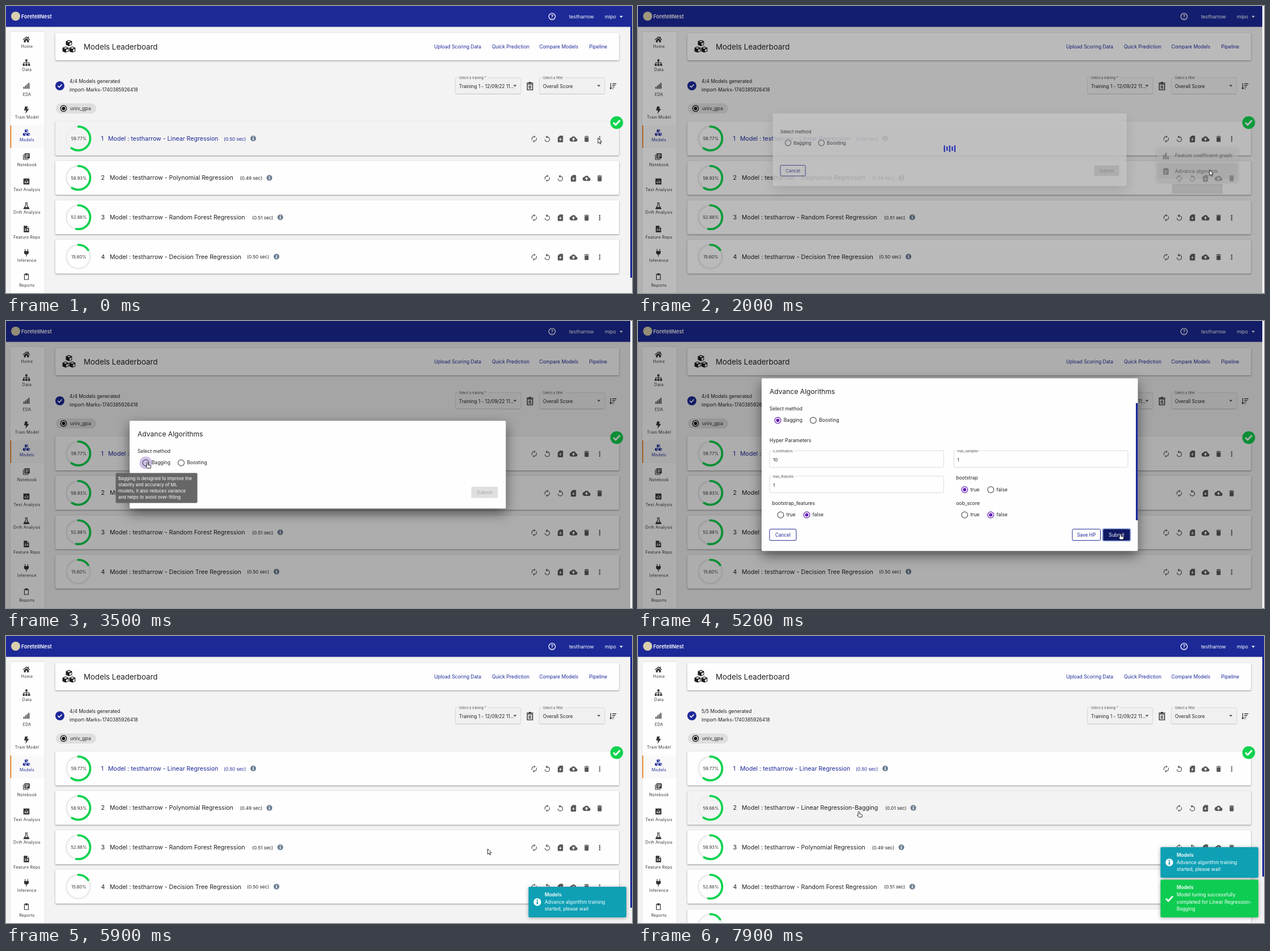
An HTML page with a canvas that plays this animation: 1104x507 px, repeating every 8000 ms.

```html
<!DOCTYPE html>
<html lang="en">
<head>
<meta charset="utf-8">
<title>Models Leaderboard</title>
<style>
  html, body { margin: 0; width: 100%; height: 100%; overflow: hidden; background: #f3f3f3; }
  canvas { display: block; width: 1104px; height: 507px; }
</style>
</head>
<body>
<canvas id="stage"></canvas>
<script>
const W = 1104, H = 507, LOOP = 8000, STEP = 100;
const NAVY = '#1c2997', INK = '#222', GREEN = '#0fd350', PURPLE = '#641bb4', GREY = '#585858';
const USER = 'testharrow';

const canvas = document.getElementById('stage');
const ctx = canvas.getContext('2d');
const dpr = window.devicePixelRatio || 1;
canvas.width = W * dpr;
canvas.height = H * dpr;

const cube = (x, y) => `M${x} ${y}l5 2v6l-5 2-5-2v-6z` +
  `M${x} ${y + 1.3}l3 1.2-3 1.2-3-1.2zM${x + 1} ${y + 5.3}l3-1.3v3.4l-3 1.2z`;

// Icons live in a 24 unit box.
const ICONS = {
  home: 'M12 3L1 12.5l1.5 1.7L12 6l9.5 8.2 1.5-1.7-4-3.5V4h-3v2.5zM12 8l-7.5 6.5V21H10v-5h4v5h5.5v-6.5z',
  tree: 'M9 2h6v6H9zM1 16h6v6H1zM9 16h6v6H9zM17 16h6v6h-6zM11 8h2v3h8v5h-2v-3h-6v3h-2v-3H5v3H3v-5h8z',
  bars: 'M3 15h3v6H3zM8 11h3v10H8zM13 7h3v14h-3zM18 3h3v18h-3z',
  bolt: 'M8 1h8l-2 7h6L9 23l2-10H5z',
  cubes: cube(12, 1) + cube(6.5, 11.5) + cube(17.5, 11.5),
  book: 'M4 6H2v14c0 1.1.9 2 2 2h14v-2H4zM20 2H8c-1.1 0-2 .9-2 2v12c0 1.1.9 2 2 2h12c1.1 0 2-.9 2-2V4c0-1.1-.9-2-2-2zM19 11H9V9h10zM15 15H9v-2h6zM19 7H9V5h10z',
  chart: 'M3 3h18v18H3zM7 11h2v6H7zM11 7h2v2h-2zM11 13h2v4h-2zM15 10h2v7h-2z',
  flask: 'M8 2h8v2h-1v6l6 10c.5 1-.2 2-1.2 2H4.2c-1 0-1.7-1-1.2-2L9 10V4H8zM11 4v6.5L8 16h8l-3-5.5V4z',
  file: 'M4 2h10l6 6v14H4zM7 11h5v2H7zM7 15h5v2H7zM14 4v5h5zM14 12h3v5h-3z',
  plug: 'M7 1h2v6h6V1h2v6h2v4c0 3.5-2.5 6-6 6.5V23h-2v-5.5C7.5 17 5 14.5 5 11V7h2z',
  clip: 'M5 4h4V2h6v2h4v18H5zM7 6v14h10V6h-2v2H9V6z',
  task: 'M4 3h5V1h6v2h5v18H4zM7 8h10v2H7zM7 12h10v2H7zM7 16h7v2H7z',
  columns: 'M4 9h4v12H4zM10 3h4v18h-4zM16 13h4v8h-4z',
  bin: 'M9 1h6v2h6v2H3V3h6zM4 6h16v17H4zM6 8v13h12V8zM9 10h2v9H9zM13 10h2v9h-2z',
  sort: 'M5 3h2v14h3l-4 5-4-5h3zM11 4h12v2H11zM11 9h9v2h-9zM11 14h6v2h-6zM11 19h3v2h-3z',
  sync: 'M12 6v3l4-4-4-4v3c-4.42 0-8 3.58-8 8 0 1.57.46 3.03 1.24 4.26L6.7 14.8c-.45-.83-.7-1.79-.7-2.8 0-3.31 2.69-6 6-6zm6.76 1.74L17.3 9.2c.44.84.7 1.79.7 2.8 0 3.31-2.69 6-6 6v-3l-4 4 4 4v-3c4.42 0 8-3.58 8-8 0-1.57-.46-3.03-1.24-4.26z',
  replay: 'M12 5V1L7 6l5 5V7c3.31 0 6 2.69 6 6s-2.69 6-6 6-6-2.69-6-6H4c0 4.42 3.58 8 8 8s8-3.58 8-8-3.58-8-8-8z',
  save: 'M18 2h-8L4 8v12c0 1.1.9 2 2 2h12c1.1 0 2-.9 2-2V4c0-1.1-.9-2-2-2zm-6 15l-4-4h3V9h2v4h3z',
  cloud: 'M19.35 10.04C18.67 6.59 15.64 4 12 4 9.11 4 6.6 5.64 5.35 8.04 2.34 8.36 0 10.91 0 14c0 3.31 2.69 6 6 6h13c2.76 0 5-2.24 5-5 0-2.64-2.05-4.78-4.65-4.96zM14 13v4h-4v-4H7l5-5 5 5z',
  trash: 'M6 19c0 1.1.9 2 2 2h8c1.1 0 2-.9 2-2V7H6zM19 4h-3.5l-1-1h-5l-1 1H5v2h14z',
  dots: 'M10 4h4v4h-4zM10 10h4v4h-4zM10 16h4v4h-4z'
};
for (const k in ICONS) ICONS[k] = new Path2D(ICONS[k]);
const HAND = new Path2D('M3 0c.9 0 1.3.6 1.3 1.3v3l3.7.8c.8.2 1.2.7 1.1 1.5L8.5 10H3L0 6.8c.7-.8 1.3-.6 1.8-.1V1.3C1.8.6 2.2 0 3 0z');
const ARROW = new Path2D('M0 0v9.5l2.2-2 1.5 3.3 1.6-.7-1.5-3.2h3z');

const ramp = (t, a, b) => Math.min(1, Math.max(0, (t - a) / (b - a)));
const within = (t, a, b) => t >= a && t < b;

function text(s, x, y, size, color = INK, align = 'left', weight = 400) {
  ctx.font = `${weight} ${size}px Inter, sans-serif`;
  ctx.textAlign = align;
  ctx.fillStyle = color;
  ctx.fillText(s, x, y + size * 0.35);
}
function box(x, y, w, h, fill, r = 0, stroke, line = 1) {
  ctx.beginPath();
  ctx.roundRect(x, y, w, h, r);
  if (fill) { ctx.fillStyle = fill; ctx.fill(); }
  if (stroke) { ctx.strokeStyle = stroke; ctx.lineWidth = line; ctx.stroke(); }
}
function shadowBox(x, y, w, h, fill, r, blur, dy, alpha) {
  ctx.save();
  ctx.shadowColor = `rgba(0,0,0,${alpha})`;
  ctx.shadowBlur = blur * dpr;
  ctx.shadowOffsetY = dy * dpr;
  box(x, y, w, h, fill, r);
  ctx.restore();
}
function disc(x, y, r, fill, stroke, line = 1) {
  ctx.beginPath();
  ctx.arc(x, y, r, 0, Math.PI * 2);
  if (fill) { ctx.fillStyle = fill; ctx.fill(); }
  if (stroke) { ctx.strokeStyle = stroke; ctx.lineWidth = line; ctx.stroke(); }
}
function icon(name, x, y, size = 14, color = GREY) {
  ctx.save();
  ctx.translate(x - size / 2, y - size / 2);
  ctx.scale(size / 24, size / 24);
  ctx.fillStyle = color;
  ctx.fill(ICONS[name], 'evenodd');
  ctx.restore();
}
function tick(x, y, s, color = '#fff', line = 2) {
  ctx.beginPath();
  ctx.moveTo(x - s, y);
  ctx.lineTo(x - s * 0.3, y + s * 0.7);
  ctx.lineTo(x + s, y - s * 0.7);
  ctx.strokeStyle = color;
  ctx.lineWidth = line;
  ctx.stroke();
}
function caret(x, y, color) {
  ctx.beginPath();
  ctx.moveTo(x - 3, y - 1.5);
  ctx.lineTo(x + 3, y - 1.5);
  ctx.lineTo(x, y + 1.7);
  ctx.fillStyle = color;
  ctx.fill();
}
function info(x, y, r, back, front) {
  disc(x, y, r, back);
  box(x - r * 0.17, y - r * 0.15, r * 0.34, r * 0.75, front);
  disc(x, y - r * 0.48, r * 0.2, front);
}

function drawHeader() {
  shadowBox(0, 0, W, 36.7, NAVY, 0, 2, 0.5, 0.2);
  disc(17, 18, 8, '#d8cfae');
  text('ForetellNest', 27, 19, 9.2, '#fff', 'left', 600);
  disc(963, 18.5, 5.7, null, '#fff', 1.3);
  text('?', 963, 18.7, 8.5, '#fff', 'center', 600);
  text(USER, 993, 18.5, 8.7, '#fff');
  text('mipo', 1056, 18.5, 8.6, '#fff');
  caret(1085, 19, '#fff');
}

const MENU = [
  ['home', 'Home', 59, 72], ['tree', 'Data', 100, 113], ['bars', 'EDA', 141, 157],
  ['bolt', 'Train Model', 184, 197], ['cubes', 'Models', 224, 237], ['book', 'Notebook', 266, 281],
  ['chart', 'Text Analysis', 310, 325], ['flask', 'Drift Analysis', 353, 365],
  ['file', 'Feature Repo', 394, 409], ['plug', 'Inference', 436, 449.5], ['clip', 'Reports', 478, 494]
];
function drawSidebar() {
  shadowBox(8, 46, 60, 480, '#fefefe', 2, 3, 0, 0.12);
  box(8, 211, 60, 40, '#f9f9f9');
  box(7.5, 211, 1.8, 40, '#ef7d1c');
  ctx.letterSpacing = '0.3px';
  for (const [name, label, iy, ly] of MENU) {
    const color = name === 'cubes' ? NAVY : '#333';
    icon(name, 36, iy, 14, color);
    text(label, 37, ly, 7, color, 'center');
  }
  ctx.letterSpacing = '0px';
}

function drawSelect(x, label, value) {
  box(x, 126.5, 115.5, 29, '#f0f0f0', 2.5, '#d2d2d2', 0.8);
  box(x + 1, 155, 113.5, 0.8, '#bdbdbd');
  box(x + 5, 125, label.length * 2.75, 3, '#f2f2f2');
  text(label, x + 6.5, 127.5, 5.7, '#555');
  text(value, x + 6.5, 142.5, 8.3);
  caret(x + 105, 141, '#555');
}
function drawTop(count) {
  shadowBox(87, 48, 994.3, 48, '#fefefe', 2, 2.5, 1, 0.4);
  icon('cubes', 111, 72, 26, '#1c1c1c');
  text('Models Leaderboard', 137, 72, 13.3);
  const links = [['Upload Scoring Data', 755], ['Quick Prediction', 857], ['Compare Models', 940.5], ['Pipeline', 1028.5]];
  for (const [s, x] of links) text(s, x, 72.5, 8.5, NAVY);

  disc(95, 141, 8, NAVY);
  tick(95, 141, 3.6, '#fff', 1.6);
  text(`${count}/${count} Models generated`, 112, 133, 8.5);
  text('import-Marks-1740385926418', 112, 148, 8.4);
  drawSelect(792.5, 'Select a training *', 'Training 1 - 12/09/22 11...');
  drawSelect(940.5, 'Select a filter', 'Overall Score');
  icon('bin', 924, 141.5, 16, INK);
  icon('sort', 1070, 141.5, 14, INK);

  box(88, 172, 71, 18, '#dedede', 9);
  disc(101.5, 181, 5.3, null, '#111', 1.2);
  disc(101.5, 181, 3, '#111');
  text('univ_gpa', 113, 181, 8.9, '#333');
}

// name, score, seconds, x of the time, x of the info mark, has more-menu
const LINEAR = ['Linear Regression', 59.77, '0.50', 384, 436, true];
const BAGGED = ['Linear Regression-Bagging', 59.66, '0.01', 436, 485.5, false];
const OTHERS = [
  ['Polynomial Regression', 58.93, '0.49', 412.5, 464.5, false],
  ['Random Forest Regression', 52.88, '0.51', 434, 483.7, true],
  ['Decision Tree Regression', 15.6, '0.50', 425, 477, true]
];
const ACTIONS = ['sync', 'replay', 'save', 'cloud', 'trash', 'dots'];
const rowTop = i => 204 + 69.6 * i;

function drawRow(i, [name, score, sec, tx, ix, more], hover, grow) {
  const y = rowTop(i), cy = y + 30, top = -Math.PI / 2;
  shadowBox(87, y, 994.3, 60, hover ? '#f4f3f3' : '#fefefe', 2, 2.5, 1, 0.42);
  disc(127.5, cy, 21, null, '#efeeee', 3.6);
  ctx.beginPath();
  ctx.arc(127.5, cy, 21, top, top + Math.PI * 2 * score / 100 * grow);
  ctx.strokeStyle = GREEN;
  ctx.lineWidth = 3.8;
  ctx.lineCap = 'round';
  ctx.stroke();
  ctx.lineCap = 'butt';
  text(score.toFixed(2) + '%', 128.5, cy + 0.3, 7.6, '#333', 'center');
  const color = i ? INK : NAVY;
  text(i + 1, 167.5, cy, 10.8, color);
  text(`Model : ${USER} - ${name}`, i ? 183 : 180, cy, 10.6, color);
  text(`(${sec} sec)`, tx, cy + 0.8, 8.2, color);
  info(ix, cy, 5, '#6b7d92', '#fff');
  const x0 = more ? 931.5 : 954.5;
  ACTIONS.slice(0, more ? 6 : 5).forEach((a, k) => icon(a, x0 + k * 23.1, cy + 0.8, 14));
}

function drawPage(t, cur) {
  const done = t >= 6100;
  ctx.fillStyle = '#f3f3f3';
  ctx.fillRect(0, 0, W, H);
  drawSidebar();
  drawTop(done ? 5 : 4);
  const rows = done ? [LINEAR, BAGGED, ...OTHERS] : [LINEAR, ...OTHERS];
  const free = t < 500 || t >= 6000;
  rows.forEach((row, i) => {
    const hover = free && cur.y + 4 >= rowTop(i) && cur.y + 4 < rowTop(i) + 64;
    drawRow(i, row, hover, row === BAGGED ? ramp(t, 6050, 6375) : 1);
  });
  disc(1077, 206, 11.3, GREEN);
  tick(1077, 206, 5.8, '#fff', 2.8);
  drawHeader();
  box(1101, 37, 3, H, '#f3f3f3');
  box(1101, 0, 3, done ? 425 : 480, NAVY);
}

function drawMenu(t) {
  const shown = ramp(t, 400, 700) * (1 - ramp(t, 1850, 2200));
  if (!shown) return;
  ctx.save();
  ctx.globalAlpha = shown;
  shadowBox(915, 247.5, 143.5, 62.5, '#fefefe', 2, 5, 2, 0.35 * shown);
  if (t >= 1200) box(915, 278, 143.5, 27.5, 'rgba(0,0,0,.07)');
  icon('columns', 931, 265, 15, '#666');
  text('Feature coefficient graph', 947, 264.5, 8.5, '#333');
  icon('task', 931, 292.5, 14, '#666');
  text('Advance algorithm', 947, 292, 8.5, '#333');
  const tip = ramp(t, 1300, 1500) * (1 - ramp(t, 1800, 2040));
  ctx.globalAlpha = tip;
  box(942, 314, 89, 17.5, '#616161', 2);
  ctx.globalAlpha = Math.sqrt(tip);
  text('Advanced Algorithms', 986.5, 323, 7.9, '#fff', 'center');
  ctx.restore();
}

function radio(x, y, label, on) {
  disc(x, y, 5.4, null, on ? PURPLE : '#555', 1.2);
  if (on) disc(x, y, 3, PURPLE);
  text(label, x + 10.3, y, 8.5);
}
function field(x, y, label, value) {
  box(x, y, 307, 29.5, null, 2.5, '#d8d8d8', 0.9);
  box(x + 4, y - 1, label.length * 3.1 + 3, 2.5, '#fefefe');
  text(label, x + 6, y + 1, 5.8, '#555');
  text(value, x + 6, y + 16.5, 8.2);
}
function button(x, y, w, label, fill, color, border) {
  box(x, y - 10, w, 20, fill, 2, border, 1);
  text(label, x + w / 2, y, 8.3, color, 'center');
}
function drawParams() {
  text('Hyper Parameters', 232, 210.5, 8.6);
  field(232, 229, 'n_estimators', '10');
  field(557, 229, 'max_samples', '1');
  field(232, 274, 'max_features', '1');
  const choices = [['bootstrap', 561, 277.5, true], ['bootstrap_features', 236.5, 322, false], ['oob_score', 561, 322, false]];
  for (const [label, x, y, yes] of choices) {
    text(label, x, y, 8.5);
    radio(x + 15, y + 20.5, 'true', yes);
    radio(x + 61, y + 20.5, 'false', !yes);
  }
  box(878, 145, 3.5, 207, NAVY);
}
function drawDialog(t) {
  const k = ramp(t, 1800, 2100), titled = t >= 2200, full = t >= 3600;
  const h = full ? 305 : titled ? 155 : 136;
  const top = 253.7 - h / 2, base = top + h - 28.5, lift = titled ? 0 : 19;
  const scale = 0.82 + 0.18 * k;
  ctx.save();
  ctx.globalAlpha = Math.min(1, k + 0.13);
  ctx.translate(549.5, 254);
  ctx.scale(scale, scale);
  ctx.translate(-549.5, -254);
  shadowBox(218, top, 663.5, h, '#fefefe', 2, 22, 8, 0.5 * k ** 3);
  if (titled) text('Advance Algorithms', 232, top + 23.3, 12.1);
  text('Select method', 232, top + 54 - lift, 8.5);
  const ry = top + 74.3 - lift;
  if (within(t, 3200, 3800)) disc(246.5, ry, 11, 'rgba(103,58,183,.32)');
  radio(246.5, ry, 'Bagging', full);
  radio(309, ry, 'Boosting', false);
  if (full) {
    drawParams();
    button(766, base, 49.5, 'Save HP', '#fefefe', NAVY, NAVY);
  }
  button(232, base, 47, 'Cancel', null, NAVY, NAVY);
  if (full && t >= 4600) box(818.8, base - 11.5, 50.5, 23, '#8ea4dc', 3);
  if (full) button(820.5, base, 47, 'Submit', t >= 4600 ? '#101a62' : NAVY, '#fff');
  else button(820.5, base, 47, 'Submit', 'rgba(0,0,0,.12)', 'rgba(0,0,0,.27)');
  ctx.restore();
}

const HINT = ['Bagging is designed to improve the', 'stability and accuracy of ML', 'models, it also reduces variance', 'and helps to avoid over-fitting'];
function drawHint(t) {
  if (!within(t, 3300, 3800)) return;
  box(193.5, 268.5, 144, 53, 'rgba(97,97,97,.96)', 2);
  HINT.forEach((s, i) => text(s, 198, 278 + i * 11.2, 7.8, '#fff'));
}

function drawLoader(t, alpha) {
  ctx.fillStyle = `rgba(0,0,0,${alpha})`;
  ctx.fillRect(0, 0, W, H);
  for (let i = 0; i < 5; i++) {
    const wave = Math.cos(2 * Math.PI * (t / 1042 + 0.38 + 0.2 * Math.abs(i - 2)));
    const h = 20 * (0.7 + 0.3 * wave);
    box(539.3 + i * 4.6, 252 - h / 2, 2.3, h, '#2832b4', 1);
  }
}

function toast(y, h, fill, lines) {
  shadowBox(921.5, y, 172.5, h, fill, 2, 6, 1, 0.35);
  text('Models', 950, y + 14, 8.4, '#fff', 'left', 600);
  lines.forEach((s, i) => text(s, 950, y + 26.8 + i * 12.5, 8.4, '#fff'));
}
function drawToasts(t) {
  if (t < 5900) return;
  const both = t >= 6200, y = both ? 373 : 443;
  toast(y, 54, '#0fa0b5', ['Advance algorithm training', 'started, please wait']);
  info(937, y + 27, 6.7, '#fff', '#0fa0b5');
  if (!both) return;
  toast(430.5, 66.5, '#0ecc52', ['Model tuning successfully', 'completed for Linear Regression-', 'Bagging']);
  tick(937, 464, 6, '#fff', 2.8);
}

// time, x, y of the pointer tip
const PATH = [
  [0, 1044, 233], [700, 1044, 233], [1300, 1008, 290], [2200, 1008, 290], [3200, 248.5, 250],
  [3700, 248.5, 250], [4500, 849.5, 376], [6400, 849.5, 376], [7200, 500, 326], [7800, 388.5, 310], [8000, 388.5, 310]
];
function pointer(t) {
  const i = PATH.findIndex(p => p[0] > t);
  const [a, x, y] = PATH[i - 1], [b, x2, y2] = PATH[i];
  const k = ramp(t, a, b), e = k * k * (3 - 2 * k);
  return { x: x + (x2 - x) * e, y: y + (y2 - y) * e };
}
function drawPointer(t, { x, y }) {
  const hand = [[300, 1900], [3100, 3750], [4500, 5400], [6000, LOOP]].some(([a, b]) => within(t, a, b));
  const shape = hand ? HAND : ARROW;
  ctx.save();
  ctx.translate(hand ? x - 2 : x, y);
  ctx.fillStyle = '#fff';
  ctx.strokeStyle = '#111';
  ctx.lineWidth = 0.9;
  ctx.fill(shape);
  ctx.stroke(shape);
  ctx.restore();
}

function render(t) {
  ctx.setTransform(dpr, 0, 0, dpr, 0, 0);
  const cur = pointer(t);
  drawPage(t, cur);
  drawMenu(t);
  if (within(t, 1900, 5900)) {
    ctx.fillStyle = `rgba(0,0,0,${0.32 * ramp(t, 1950, 2210)})`;
    ctx.fillRect(0, 0, W, H);
    drawDialog(t);
    drawHint(t);
    if (t < 2200) drawLoader(t, 0.22);
    if (t >= 5400) drawLoader(t, 0.3);
    box(1101, 0, 3, H, '#f6f6f6');
  }
  drawToasts(t);
  drawPointer(t, cur);
}

const start = performance.now();
function frame() {
  const t = (performance.now() - start) % LOOP;
  render(Math.floor(t / STEP) * STEP);
  requestAnimationFrame(frame);
}
frame();
</script>
</body>
</html>
```
